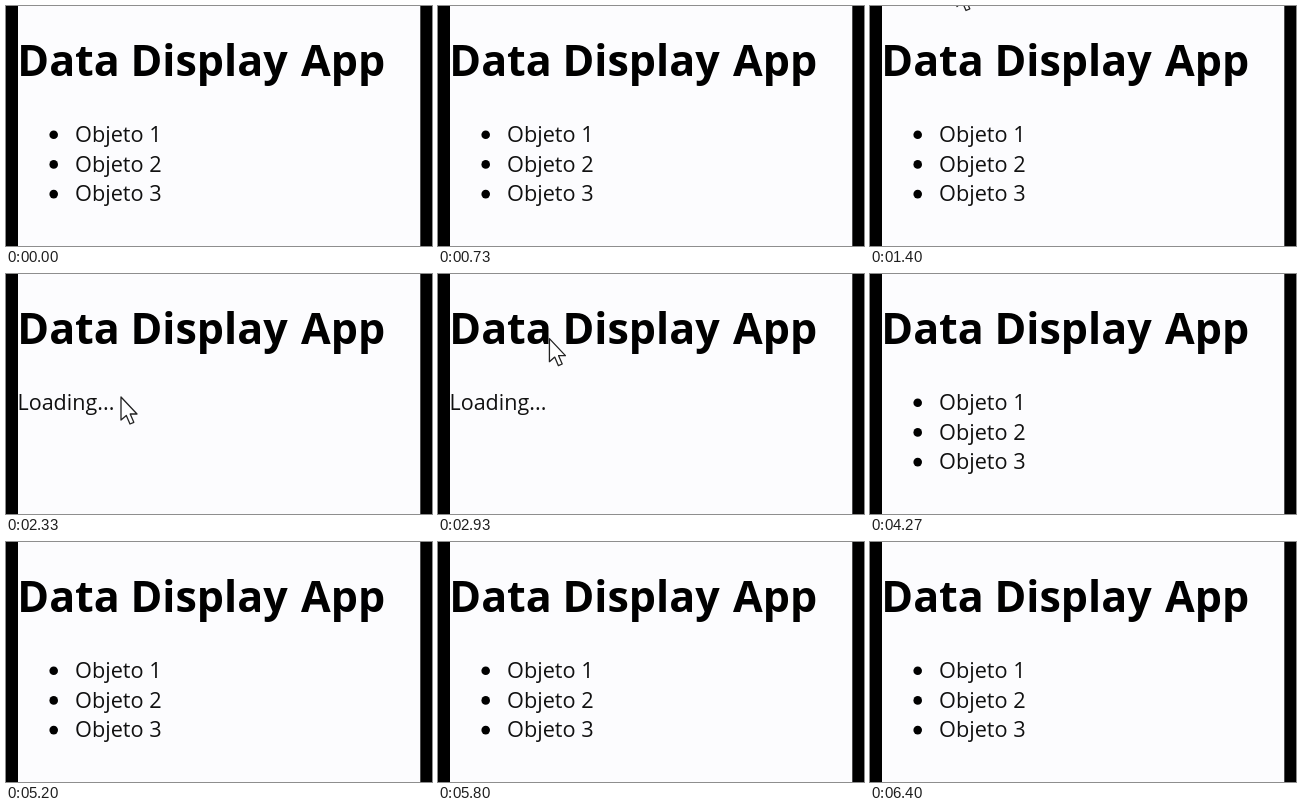
An HTML page that plays this animation: 426x240 px, repeating every 6.47 s.

```html
<!DOCTYPE html>
<html lang="en">
<head>
<meta charset="utf-8">
<title>Data Display App</title>
<style>
  html, body { margin: 0; width: 100%; height: 100%; overflow: hidden; background: #000; }
  svg { display: block; width: 100vw; height: 100vh; }
  text { font-family: "Open Sans", "Noto Sans", sans-serif; fill: #111; }
  .title { font-size: 43px; font-weight: 700; fill: #000; }
  .item { font-size: 21.7px; }
  .loading { font-size: 21.5px; }
</style>
</head>
<body>
<svg viewBox="0 0 426 240">
  <rect width="426" height="240"/>
  <rect x="12" width="402.3" height="240" fill="#fcfcfe"/>
  <text class="title" y="69.5"><tspan x="11.3">Data</tspan> <tspan x="124.5">Display</tspan> <tspan x="295">App</tspan></text>
  <g id="list"></g>
  <text id="loading" class="loading" x="11.5" y="136">Loading...</text>
  <path id="cursor" d="M0 0V23L5.3 18.4L9 27L12.8 25.3L9.2 17H16Z"
        fill="#fff" stroke="#222" stroke-width="1.3" stroke-linejoin="round"/>
</svg>
<script>
const LOOP = 6470, FPS = 15;
const LOAD_START = 2130, LOAD_END = 4130;
// Pointer stops: time, x, y
const PATH = [
  [1200, 80, -45], [1400, 87, -22.5], [1600, 78, -45],
  [2060, 84, -40], [2320, 115, 123], [2800, 115, 123], [3130, 105, -40]
];
const list = document.getElementById("list");
const loading = document.getElementById("loading");
const cursor = document.getElementById("cursor");

list.innerHTML = [1, 2, 3].map((n, i) => {
  const y = 136 + i * 29.7;
  return `<circle cx="47.7" cy="${y - 7.3}" r="4.3"/><text class="item" x="69" y="${y}">Objeto ${n}</text>`;
}).join("");

const ease = u => u * u * (3 - 2 * u);
const show = (el, on) => el.setAttribute("visibility", on ? "visible" : "hidden");

function pointerAt(t) {
  const i = PATH.findIndex(stop => stop[0] > t);
  if (i < 1) return [0, -60];
  const [t0, x0, y0] = PATH[i - 1], [t1, x1, y1] = PATH[i];
  const u = ease((t - t0) / (t1 - t0));
  return [x0 + (x1 - x0) * u, y0 + (y1 - y0) * u];
}

function draw(ms) {
  const step = Math.floor((ms % LOOP) * FPS / 1000 + 0.1);
  const t = step * 1000 / FPS;
  const busy = t >= LOAD_START && t < LOAD_END;
  show(list, !busy);
  show(loading, busy);
  cursor.setAttribute("transform", `translate(${pointerAt(t)})`);
}

function tick() {
  draw(performance.now());
  requestAnimationFrame(tick);
}
tick();
</script>
</body>
</html>
```
